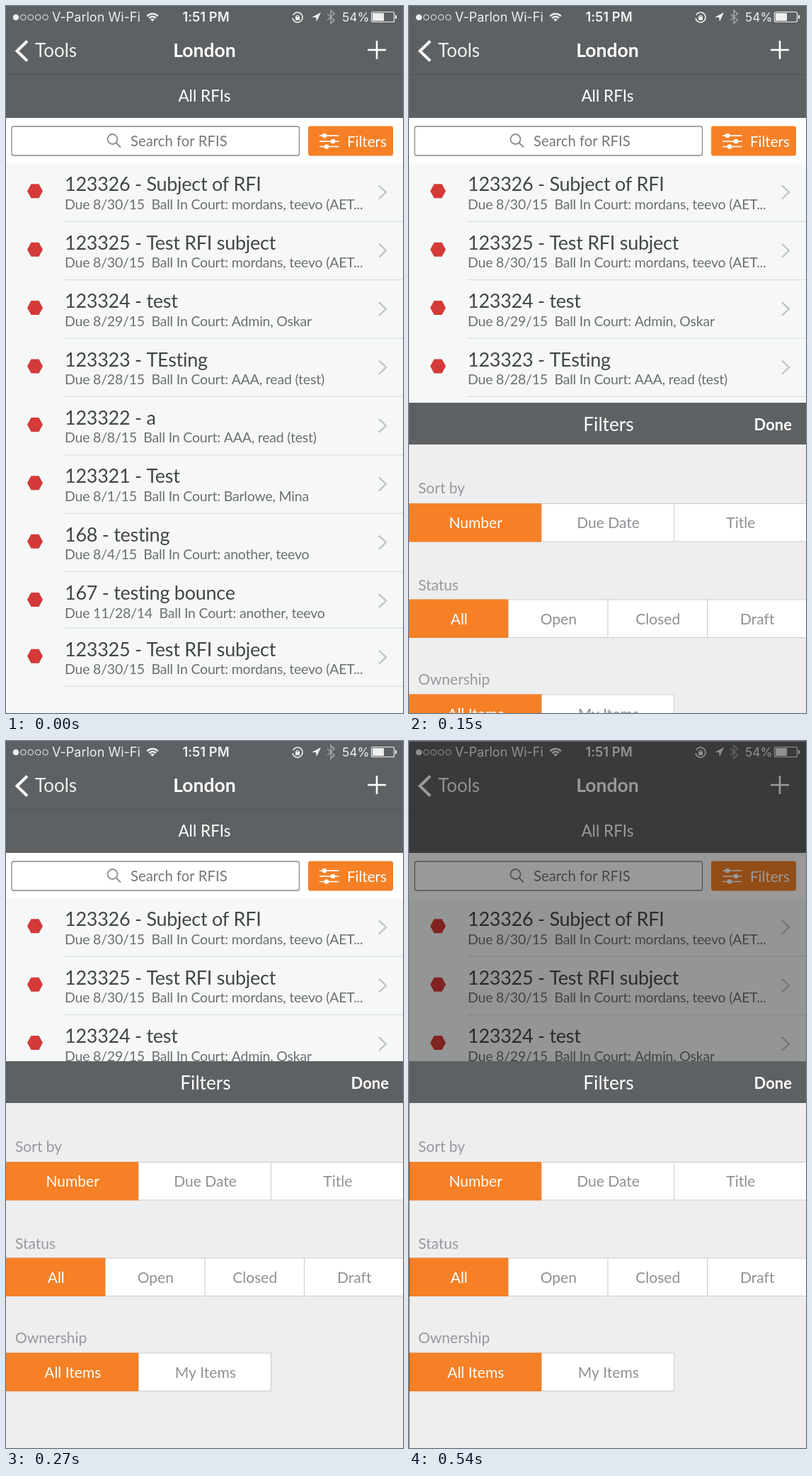
Recreate the animation shown at these times as an HTML page with a canvas. Size 561 px wide and 998 px high, loop 0.66 s.

```html
<!DOCTYPE html>
<html lang="en">
<head>
<meta charset="utf-8">
<title>RFI filters</title>
<style>
  html, body { margin: 0; width: 100%; height: 100%; overflow: hidden; background: #f6f8f8; }
  canvas { display: block; }
</style>
</head>
<body>
<canvas id="stage" width="561" height="998"></canvas>
<script>
const ctx = document.getElementById('stage').getContext('2d');
const W = 561, H = 998;
const STEP = 30, LOOP = 660;
const BAR = '#5e6163', ORANGE = '#f58026', BORDER = '#c9cacb';
const LATO = 'Lato, sans-serif', SYSTEM = 'Inter, sans-serif';
// Any spacing other than zero also switches ligatures off.
const NORMAL = '0.01px', TIGHT = '-0.01em';

const ROWS = [
  ['123326 - Subject of RFI', '8/30/15', 'mordans, teevo (AET...'],
  ['123325 - Test RFI subject', '8/30/15', 'mordans, teevo (AET...'],
  ['123324 - test', '8/29/15', 'Admin, Oskar'],
  ['123323 - TEsting', '8/28/15', 'AAA, read (test)'],
  ['123322 - a', '8/8/15', 'AAA, read (test)'],
  ['123321 - Test', '8/1/15', 'Barlowe, Mina'],
  ['168 - testing', '8/4/15', 'another, teevo'],
  ['167 - testing bounce', '11/28/14', 'another, teevo'],
  ['123325 - Test RFI subject', '8/30/15', 'mordans, teevo (AET...']
];

function rect(x, y, w, h, color) {
  ctx.fillStyle = color;
  ctx.fillRect(x, y, w, h);
}

function text(str, x, y, size, color, { align = 'left', weight = 400, family = LATO, spacing = NORMAL } = {}) {
  ctx.font = `${weight} ${size}px ${family}`;
  ctx.letterSpacing = spacing;
  ctx.textAlign = align;
  ctx.fillStyle = color;
  ctx.fillText(str, x, y);
}

function line(points, color, width) {
  ctx.beginPath();
  points.forEach(([x, y]) => ctx.lineTo(x, y));
  ctx.strokeStyle = color;
  ctx.lineWidth = width;
  ctx.stroke();
}

function arc(x, y, r, color, width = 0, from = 0, to = Math.PI * 2) {
  ctx.beginPath();
  ctx.arc(x, y, r, from, to);
  if (width) {
    ctx.strokeStyle = color;
    ctx.lineWidth = width;
    ctx.stroke();
  } else {
    ctx.fillStyle = color;
    ctx.fill();
  }
}

function polygon(points, color) {
  ctx.beginPath();
  points.forEach(([x, y]) => ctx.lineTo(x, y));
  ctx.fillStyle = color;
  ctx.fill();
}

function roundRect(x, y, w, h, r) {
  ctx.beginPath();
  ctx.roundRect(x, y, w, h, r);
}

function statusBar() {
  const ink = '#eeefef';
  arc(14, 16, 4.3, ink);
  for (let i = 1; i < 5; i++) arc(14 + i * 10.4, 16, 3.8, ink, 1);
  text('V-Parlon Wi-Fi', 65, 22, 18, ink, { family: SYSTEM });
  for (const r of [3.5, 7.5, 11.5]) arc(207, 21.5, r - 1, ink, 2.6, -Math.PI * 0.76, -Math.PI * 0.24);
  polygon([[204.5, 19], [209.5, 19], [207, 22]], ink);
  text('1:51 PM', 282.5, 22, 18.4, ink, { align: 'center', weight: 600, family: SYSTEM });

  arc(412, 16, 7, ink, 1.6, -Math.PI * 0.85, Math.PI * 0.95);
  rect(409, 15, 6, 5, ink);
  arc(412, 15, 2, ink, 1.2, Math.PI, 0);
  polygon([[432, 16], [445, 9], [439, 22], [438, 16]], ink);
  line([[454, 11], [464, 20], [459, 25], [459, 6], [464, 11], [454, 20]], '#9fa1a3', 1.6);
  text('54%', 475, 22, 17.3, ink, { family: SYSTEM });
  roundRect(516.5, 8.5, 32, 14, 2);
  ctx.strokeStyle = ink;
  ctx.lineWidth = 1.2;
  ctx.stroke();
  rect(518, 10, 16, 11, ink);
  rect(550, 13, 2, 5, ink);
}

function header() {
  rect(0, 0, W, 158, BAR);
  rect(0, 96, W, 1, '#535658');
  statusBar();
  line([[30, 49.5], [15.5, 63.5], [30, 77.5]], '#fff', 4);
  text('Tools', 41, 72, 26, '#eff0f0');
  text('London', 280.5, 72, 26.5, '#fff', { align: 'center', weight: 700 });
  line([[511, 62], [537, 62]], '#fff', 2.6);
  line([[524, 49], [524, 75]], '#fff', 2.6);
  text('All RFIs', 280.5, 135, 22.5, '#fff', { align: 'center' });
}

function searchBar() {
  rect(0, 158, W, 64, '#fff');
  roundRect(8, 170, 406.5, 41, 3);
  ctx.strokeStyle = '#858789';
  ctx.lineWidth = 1.3;
  ctx.stroke();
  arc(150.5, 188, 7, '#8b8d8f', 1.8);
  line([[155.5, 193], [162, 199.5]], '#8b8d8f', 2);
  text('Search for RFIS', 176, 198, 20.3, '#75787a');

  roundRect(427, 169.5, 120, 42, 3);
  ctx.fillStyle = ORANGE;
  ctx.fill();
  [[450, 183], [462, 191], [453, 198.5]].forEach(([x, y]) => {
    line([[443, y], [470.5, y]], '#fff', 1.6);
    arc(x, y, 3.3, '#fff');
  });
  text('Filters', 482, 199, 20.5, '#fff');
}

function separator(y) {
  rect(82, y, W - 82, 1.2, '#dadddd');
}

function row([title, due, court], y) {
  polygon([[30, y + 39], [35.5, y + 29], [46.5, y + 29], [52, y + 39], [46.5, y + 49], [35.5, y + 49]], '#d43a38');
  text(title, 83, y + 39, 27, '#434648', { spacing: TIGHT });
  text(`Due ${due}  Ball In Court: ${court}`, 83, y + 64.5, 19.5, '#6c6f71', { spacing: TIGHT });
  line([[527, y + 31], [537, y + 40.5], [527, y + 50]], '#c2c5c7', 2.4);
}

function list() {
  const pitch = 82.4, last = ROWS.length - 1;
  ROWS.forEach((data, i) => {
    const y = 222.3 + i * pitch - (i === last ? 2.8 : 0);
    if (i) separator(y - 1.2);
    row(data, y);
    if (i === last) separator(y + pitch - 1.4);
  });
}

function segments(labels, y, width) {
  const w = width / labels.length, h = 54.5;
  rect(0, y, width, h, '#fff');
  line([[0, y + 0.5], [width, y + 0.5]], BORDER, 1);
  line([[0, y + h - 0.5], [width, y + h - 0.5]], BORDER, 1);
  if (width < W) line([[width - 0.5, y], [width - 0.5, y + h]], BORDER, 1);
  labels.forEach((label, i) => {
    if (i) line([[i * w, y], [i * w, y + h]], BORDER, 1);
    else rect(0, y, w, h, ORANGE);
    text(label, (i + 0.5) * w + 0.5, y + 35, 21, i ? '#8d9094' : '#fff', { align: 'center' });
  });
}

function panel(dim) {
  const label = '#9599a0';
  rect(0, 59, W, H, '#eee');
  rect(0, 0, W, 59, BAR);
  text('Filters', 282, 40, 26.3, '#fff', { align: 'center' });
  text('Done', 541, 39, 22, '#fff', { align: 'right', weight: 700 });
  text('Sort by', 13, 128, 21, label);
  segments(['Number', 'Due Date', 'Title'], 142, 562);
  text('Status', 13, 265, 21, label);
  segments(['All', 'Open', 'Closed', 'Draft'], 277.5, 562);
  text('Ownership', 13, 398, 21, label);
  segments(['All Items', 'My Items'], 411.5, 375);
  rect(0, 59, 1, H, `rgba(0,0,0,${dim})`);
}

// Constant speed with a short soft landing.
function panelTop(step) {
  const softness = 28;
  return 452 + softness * Math.log1p(Math.exp((546 - 87.8 * step) / softness));
}

function draw(step) {
  rect(0, 0, W, H, '#f6f8f8');
  header();
  searchBar();
  list();

  const dim = 0.4 * Math.max(0, step - 9) / 9;
  rect(0, 1, W, H, `rgba(0,0,0,${dim})`);
  if (step > 0) {
    ctx.save();
    ctx.translate(0, Math.round(panelTop(step)));
    panel(dim);
    ctx.restore();
  }
}

function frame(now) {
  draw(Math.min(18, Math.floor((now % LOOP) / STEP)));
  requestAnimationFrame(frame);
}
requestAnimationFrame(frame);
</script>
</body>
</html>
```
